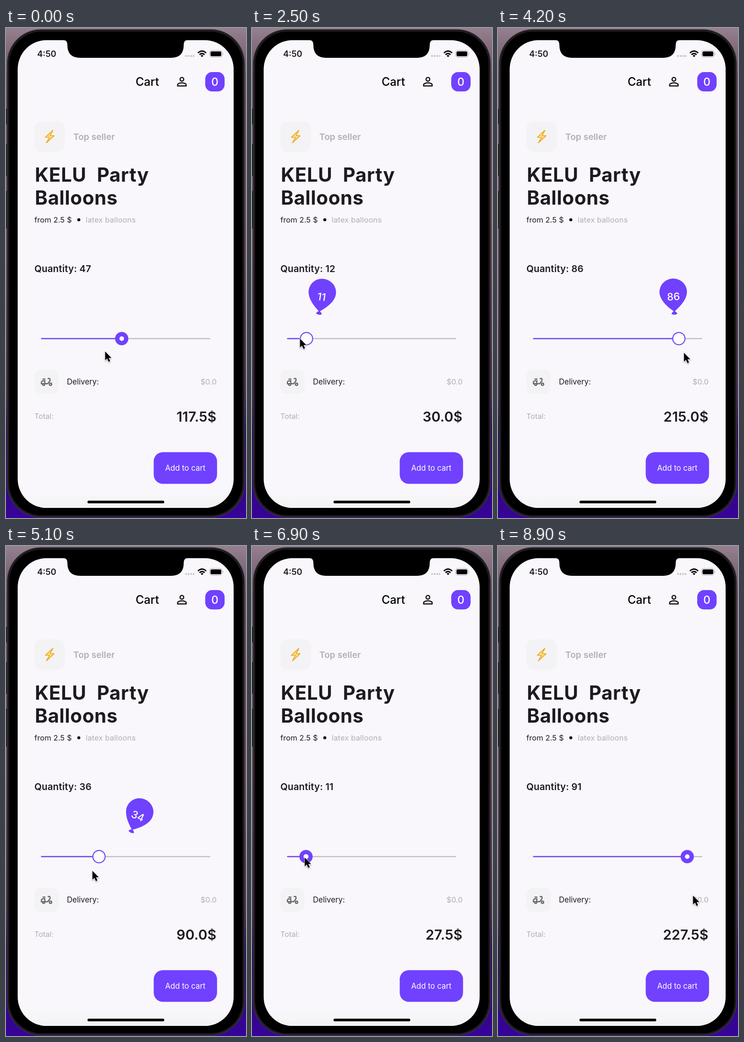
An HTML page that plays this animation: 524x1068 px, repeating every 9 s.

```html
<!DOCTYPE html>
<html lang="en">
<head>
<meta charset="utf-8">
<title>Balloon slider</title>
<style>
  html, body { margin: 0; width: 100%; height: 100%; overflow: hidden; background: #000; }
  svg { display: block; width: 524px; height: 1068px; }
  text { font-family: Inter, "Open Sans", sans-serif; font-optical-sizing: none; font-size: 16.5px; fill: #1d1a20; white-space: pre; }
  .muted { fill: #b0aeb3; }
  .medium { font-weight: 500; }
  .semi { font-weight: 600; }
  .title { font-size: 42px; font-weight: 700; letter-spacing: .6px; }
  .white { fill: #fff; }
  .end { text-anchor: end; }
  .mid { text-anchor: middle; }
  .accent { fill: #7041ff; }
  .tile { fill: #f3f2f5; }
</style>
</head>
<body>
<svg viewBox="0 0 524 1068">
  <defs>
    <linearGradient id="wall" x2="0" y2="1">
      <stop offset="0" stop-color="#94808e"/>
      <stop offset=".1" stop-color="#6c5066"/>
      <stop offset=".45" stop-color="#74485f"/>
      <stop offset=".75" stop-color="#4c2a5c"/>
      <stop offset=".82" stop-color="#2c0a60"/>
      <stop offset="1" stop-color="#360498"/>
    </linearGradient>
    <linearGradient id="foot" x2="0" y2="1">
      <stop offset="0" stop-color="#f2f2f3" stop-opacity="0"/>
      <stop offset="1" stop-color="#f2f2f3"/>
    </linearGradient>
    <clipPath id="screen"><rect x="25.5" y="26.5" width="471.5" height="1019.5" rx="63"/></clipPath>
    <filter id="shadow" x="-50%" y="-50%" width="200%" height="200%">
      <feDropShadow dx="0" dy="1.5" stdDeviation="1.5" flood-opacity=".4"/>
    </filter>
  </defs>

  <!-- phone -->
  <rect width="524" height="1068" fill="url(#wall)"/>
  <path d="M0 176h2v34h-2zM0 253h2v69h-2zM0 355h2v82h-2z" fill="#1c1b1d"/>
  <rect x="2.5" y="3" width="518.5" height="1063.5" rx="74" fill="#1d1c1e" stroke="#4a474b"/>
  <rect x="7" y="8" width="509.5" height="1054" rx="70"/>
  <g clip-path="url(#screen)">
    <rect width="524" height="1068" fill="#f9f7fb"/>
    <rect y="1012" width="524" height="34" fill="url(#foot)"/>
  </g>
  <path d="M124 26Q134 26 134 37Q134 65 162 65H360Q388 65 388 37Q388 26 398 26z"/>
  <rect x="178" y="1030.300" width="167.500" height="5.700" rx="2.850"/>

  <!-- status bar -->
  <text x="68" y="63" class="semi" style="font-size:18.5px">4:50</text>
  <path d="M393 61H410" stroke="#c3c1c5" stroke-width="4" stroke-linecap="round" stroke-dasharray="0 5.5"/>
  <g fill="none" stroke="#000" stroke-width="3">
    <path d="M419 54.5Q428 46 437 54.5M422.5 58.2Q428 53 433.5 58.2"/>
    <path d="M428 63.5L425 60.3Q428 57.8 431 60.3z" fill="#000" stroke="none"/>
  </g>
  <rect x="444.5" y="49" width="27.5" height="14.5" rx="4.5" fill="none" stroke="#a5a3a7"/>
  <rect x="446.5" y="51" width="23.5" height="10.5" rx="2.8"/>
  <path d="M473.5 54q2 2 0 4.500z" fill="#a5a3a7"/>

  <!-- header -->
  <text x="283" y="126" class="medium" style="font-size:25px;fill:#000">Cart</text>
  <g transform="translate(368.3 101.200) scale(1.31)" fill="none" stroke="#111" stroke-width="1.9">
    <circle cx="12" cy="8" r="3.05"/>
    <path d="M4.950 19.050V17C4.950 15.3 9 13.950 12 13.950S19.050 15.3 19.050 17V19.050z"/>
  </g>
  <rect x="435" y="96" width="42.300" height="42.300" rx="15" class="accent"/>
  <text x="456" y="126" class="medium white mid" style="font-size:24px">0</text>

  <!-- product -->
  <rect x="62" y="203.5" width="66.5" height="66.5" rx="16" class="tile"/>
  <path d="M102.500 222.800L86 238.200L95 238.500L88 250.300L105 234.800L96.300 234.400z" fill="#fbdf8c" stroke="#eda412" stroke-width="1.6" stroke-linejoin="round"/>
  <text x="147" y="243.5" class="semi muted" style="font-size:19px;letter-spacing:.1px">Top seller</text>
  <text x="63" y="335" class="title">KELU<tspan x="198.5">Party</tspan></text>
  <text x="63" y="385" class="title">Balloons</text>
  <text x="62" y="424" letter-spacing=".1">from 2.5 $</text>
  <circle cx="159" cy="418" r="3.3"/>
  <text x="174" y="424" class="muted" letter-spacing=".15">latex balloons</text>
  <text x="62" y="532" class="semi" style="font-size:20.5px;letter-spacing:.15px" id="quantity"></text>

  <!-- order -->
  <rect x="62" y="745" width="53" height="52.5" rx="14" class="tile"/>
  <path transform="translate(73.5 756.5) scale(1.25)" fill="#666" fill-rule="evenodd" d="M19 7c0-1.1-.9-2-2-2h-3v2h3v2.650L13.520 14H10V9H6c-2.210 0-4 1.790-4 4v3h2c0 1.660 1.340 3 3 3s3-1.340 3-3h4.480L19 10.350zM4 14v-1c0-1.1.9-2 2-2h2v3zM7 17c-.55 0-1-.45-1-1h2c0 .55-.45 1-1 1zM5 6h5v2H5zM19 13a3 3 0 0 0 0 6a3 3 0 0 0 0-6zM19 17a1 1 0 0 1 0-2a1 1 0 0 1 0 2z"/>
  <text x="133" y="777" style="font-size:16.8px">Delivery:</text>
  <text x="460" y="777" class="muted end">$0.0</text>
  <text x="62" y="852" class="muted" style="font-size:16.2px">Total:</text>
  <text x="459.5" y="857.5" class="semi end" style="font-size:30px;letter-spacing:.2px" id="total"></text>
  <rect x="322.5" y="924.5" width="138.3" height="69" rx="20" class="accent"/>
  <text x="391.5" y="965" class="white mid" style="font-size:16.8px">Add to cart</text>

  <!-- slider -->
  <rect x="77" y="675.7" width="369" height="2.6" rx="1" fill="#c1bfc3"/>
  <rect x="76.5" y="675.7" height="2.6" rx="1" class="accent" id="active"/>
  <g id="thumb">
    <circle r="14.5" class="accent"/>
    <circle fill="#fff" id="hole"/>
  </g>
  <g id="balloon">
    <path class="accent" d="M0 -7C-12 -16 -30 -32 -30 -50A30 29 0 0 1 30 -50C30 -32 12 -16 0 -7zM0 -8.5Q5 -6 6.5 -2Q0 2 -6.5 -2Q-5 -6 0 -8.5z"/>
    <text y="-31.5" class="medium white mid" style="font-size:22.5px" id="count"></text>
  </g>
  <path id="cursor" d="M0 0V21.5L4.9 16.9L8.4 25L12.2 23.4L8.7 15.5H15.3z" stroke="#fff" stroke-width="1.6" paint-order="stroke" filter="url(#shadow)"/>
</svg>
<script>
const LOOP = 9000, LEFT = 77, STEP = 3.69, PRICE = 2.5;
const LAG = 190, LABEL_DELAY = 25, CURSOR_LEAD = 25, GRIP_TIME = 300, PIVOT = 255;

const $ = id => document.getElementById(id);
const clamp = v => Math.min(1, Math.max(0, v));
const ease = u => (1 - Math.cos(Math.PI * clamp(u))) / 2;

// Each move is [start, end, value reached], eased; the value holds in between.
const track = (initial, ...moves) => t => moves.reduce(
  (v, [from, to, goal]) => v + (goal - v) * ease((t - from) / (to - from)), initial);

const units = track(47.6, [900, 950, 48.2], [1300, 3010, 2], [3010, 3900, 86.15],
  [4450, 5490, 11.1], [6910, 8100, 91.1]);
const cursorY = track(705, [500, 900, 677], [3100, 4000, 708], [5500, 6800, 679], [8350, 8850, 762]);
const cursorShift = track(-36, [500, 900, 0], [5600, 6800, 8], [7000, 8000, 0]);

const thumbX = t => LEFT + STEP * units(t);
const cursorX = t => PIVOT + 1.08 * (thumbX(t + CURSOR_LEAD) - PIVOT) + cursorShift(t);

const held = (t, from, to) => Math.min(clamp((t - from) / GRIP_TIME), clamp((to - t) / GRIP_TIME));
const grip = t => Math.max(held(t, 940, 6150), held(t, 6885, 8550));

// Exponentially weighted mean of the thumb's past positions.
function balloonX(t, samples = 40) {
  let sum = 0;
  for (let i = 0; i < samples; i++) sum += thumbX(t + LAG * Math.log((i + .5) / samples));
  return sum / samples;
}

function draw(t) {
  const x = thumbX(t), knot = balloonX(t), g = grip(t);
  const quantity = Math.floor(units(t - LABEL_DELAY));

  $('quantity').textContent = `Quantity: ${quantity}`;
  $('total').textContent = `${(quantity * PRICE).toFixed(1)}$`;
  $('count').textContent = Math.floor(units(t));

  $('active').setAttribute('width', x - LEFT);
  $('thumb').setAttribute('transform', `translate(${x} 677)`);
  $('hole').setAttribute('r', 5 + 7.3 * g);
  $('balloon').setAttribute('visibility', g > .1 ? 'visible' : 'hidden');
  $('balloon').setAttribute('transform',
    `translate(${knot} ${656 - 31 * g}) rotate(${(knot - x) * .33}) scale(${g})`);
  $('cursor').setAttribute('transform', `translate(${cursorX(t)} ${cursorY(t)}) scale(.9)`);
}

function tick() {
  draw(performance.now() % LOOP);
  requestAnimationFrame(tick);
}
tick();
</script>
</body>
</html>
```
